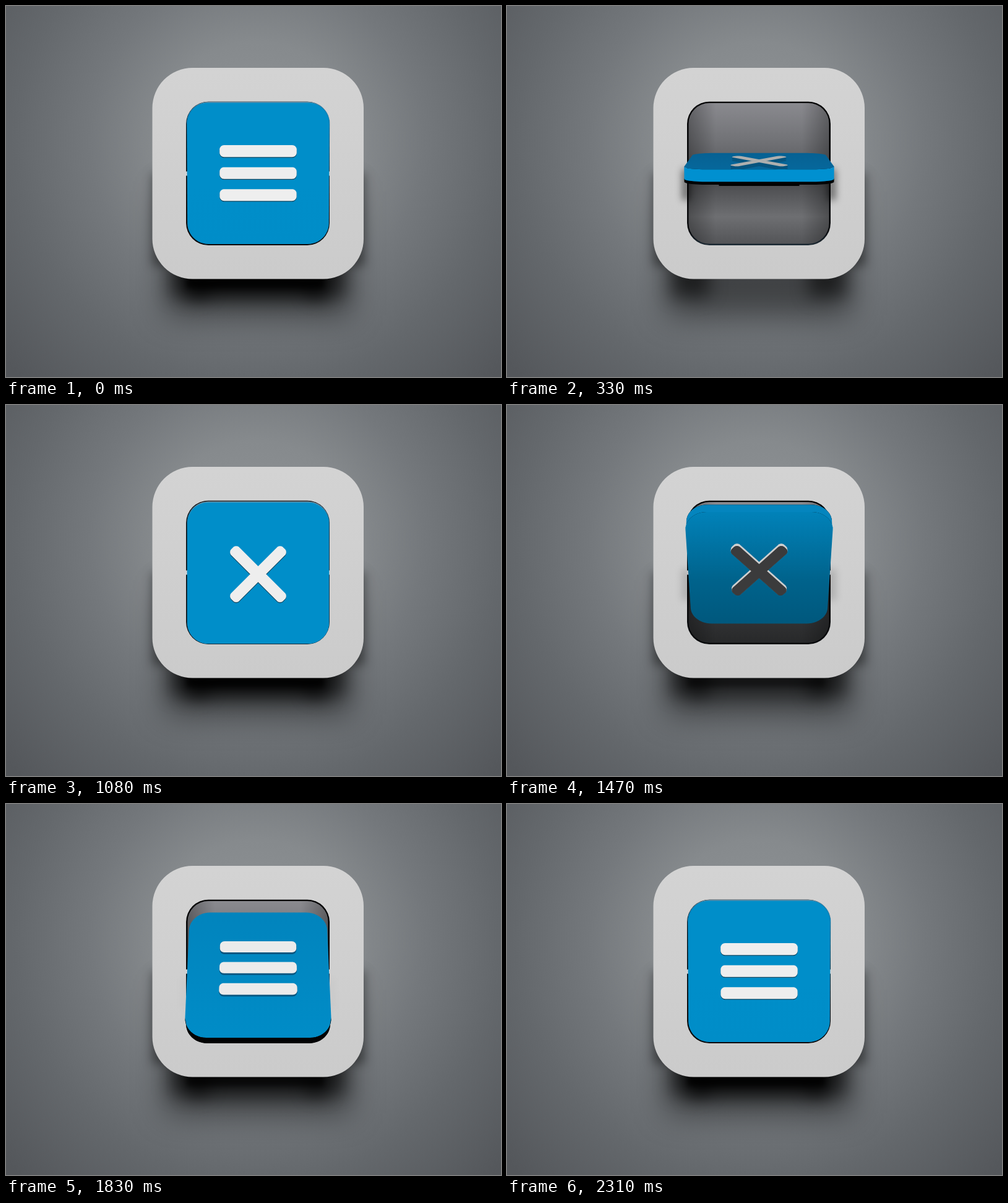
These frames come from a looping animation (800 by 600 pixels, 2.34 s). An HTML page with a canvas:

```html
<!DOCTYPE html>
<html lang="en">
<head>
<meta charset="utf-8">
<title>Flip button</title>
<style>
html, body { margin: 0; width: 100%; height: 100%; overflow: hidden; background: #63676b; }
canvas { display: block; width: 800px; height: 600px; }
</style>
</head>
<body>
<canvas id="stage" width="800" height="600"></canvas>
<script>
const ctx = document.getElementById('stage').getContext('2d');
const LOOP = 2340, STEP = 30;
const AXIS = { x: 407.5, y: 271.5 }, DEPTH = 1360;
const HALF = 114, THICK = 10;
const BLUE = [0, 142, 201];

// total rotation in degrees over time
const KEYS = [
  [0, 4], [60, 9], [180, 40], [330, 97], [480, 170], [570, 200], [630, 203],
  [780, 176], [930, 181], [1080, 180], [1230, 182], [1350, 195], [1500, 225],
  [1620, 260], [1740, 303], [1830, 332], [1950, 362], [2040, 371],
  [2190, 365], [2310, 364], [2340, 364]
];

function spinAt(time) {
  let i = 0;
  while (i < KEYS.length - 2 && KEYS[i + 1][0] <= time) i++;
  const slope = n => {
    const a = KEYS[n - 1], b = KEYS[n + 1];
    return a && b ? (b[1] - a[1]) / (b[0] - a[0]) : 0;
  };
  const [t0, v0] = KEYS[i], [t1, v1] = KEYS[i + 1];
  const d = t1 - t0, u = (time - t0) / d, u2 = u * u, u3 = u2 * u;
  return v0 * (2 * u3 - 3 * u2 + 1) + v1 * (3 * u2 - 2 * u3) +
    d * (slope(i) * (u3 - 2 * u2 + u) + slope(i + 1) * (u3 - u2));
}

const mix = (a, b, k) => a.map((c, i) => c + (b[i] - c) * k);
const css = (c, alpha = 1) => `rgba(${c.map(Math.round).join(',')},${alpha})`;
const clamp = v => Math.max(0, Math.min(1, v));

function vertical(y0, y1, ...stops) {
  const g = ctx.createLinearGradient(0, y0, 0, y1);
  stops.forEach(([at, color]) => g.addColorStop(at, color));
  return g;
}

function roundRect(x, y, w, h, r) {
  ctx.beginPath();
  ctx.roundRect(x, y, w, h, r);
}

function blurred(x, y, w, h, blur, alpha) {
  ctx.save();
  ctx.filter = `blur(${blur}px)`;
  ctx.fillStyle = `rgba(0,0,0,${alpha})`;
  ctx.fillRect(x, y, w, h);
  ctx.restore();
}

function polygon(points, fill) {
  ctx.beginPath();
  points.forEach(p => ctx.lineTo(p[0], p[1]));
  ctx.closePath();
  ctx.fillStyle = fill;
  ctx.fill();
}

// sampled rounded rectangle, optionally turned about its centre
function outline(halfW, halfH, r, cy = 0, turn = 0) {
  const pts = [], n = 12, c = Math.cos(turn), s = Math.sin(turn);
  for (let q = 0; q < 4; q++) {
    const sx = q === 0 || q === 3 ? 1 : -1, sy = q < 2 ? 1 : -1;
    for (let i = 0; i <= n; i++) {
      const a = (q + i / n) * Math.PI / 2;
      const x = sx * (halfW - r) + r * Math.cos(a);
      const y = sy * (halfH - r) + r * Math.sin(a);
      pts.push([x * c - y * s, cy + x * s + y * c]);
    }
  }
  return pts;
}

const PLATE = outline(HALF, HALF, 34);
const MENU = [36, 1.3, -33.5].map(y => outline(61.5, 9.3, 7, y));
const CROSS = [1, -1].map(d => outline(58.5, 9, 7, -2, d * Math.PI / 4));

function makeBackdrop() {
  const g = ctx.createRadialGradient(405, 220, 0, 405, 220, 540);
  [[0, '#909497'], [.3, '#868a8d'], [.5, '#74787c'], [.72, '#64686c'], [1, '#54575b']]
    .forEach(([at, color]) => g.addColorStop(at, color));
  ctx.fillStyle = g;
  ctx.fillRect(0, 0, 800, 600);
}

function drawShadow(open) {
  const shut = 1 - open;
  blurred(258, 300, 298, 200, 26, .48);
  blurred(236, 270, 344, 150, 8, .4);
  blurred(266, 360, 60, 110, 14, .55);
  blurred(488, 360, 60, 110, 14, .55);
  blurred(292, 380, 226, 92, 14, .85 * shut);
  blurred(292, 400, 222, 56, 4, .75 * shut);
}

function drawHole(open) {
  const low = (gray, k) => css(mix([4, 5, 6], [gray, gray + 1, gray + 4], open * k));
  roundRect(291, 154.5, 232, 232.5, 36);
  ctx.fillStyle = vertical(155, 387, [0, '#8b8b90'], [.25, '#737478'], [.48, '#5a5b5e'],
    [.58, low(76, 1)], [.8, low(110, 1)], [1, low(82, 1)]);
  ctx.fill();
  ctx.save();
  ctx.clip();
  const side = ctx.createLinearGradient(291, 0, 523, 0);
  [[0, .3], [.2, 0], [.8, 0], [1, .3]].forEach(([at, a]) => side.addColorStop(at, `rgba(0,0,0,${a})`));
  ctx.fillStyle = side;
  ctx.fillRect(291, 154, 232, 234);
  roundRect(291, 154.5, 232, 232.5, 36);
  ctx.lineWidth = 5;
  ctx.strokeStyle = vertical(155, 387, [0, '#020203'], [.9, '#08090b'], [1, open > .6 ? '#1d2b36' : '#06080a']);
  ctx.stroke();
  ctx.restore();
}

function drawFrame() {
  ctx.beginPath();
  ctx.roundRect(236.5, 100, 341.5, 341.5, 65);
  ctx.roundRect(291, 154.5, 232, 232.5, 36);
  ctx.fillStyle = vertical(100, 441, [0, '#d3d3d3'], [1, '#cbcbcb']);
  ctx.fill('evenodd');
}

function drawPins() {
  ctx.fillStyle = '#d2d3d5';
  roundRect(290, 267.5, 5, 7, 1.5);
  ctx.fill();
  roundRect(519, 267.5, 5, 7, 1.5);
  ctx.fill();
}

function drawPlate(spin) {
  const side = Math.round(spin / 180);
  const degrees = side * 180 - spin;
  const tilt = degrees * Math.PI / 180;
  const sin = Math.sin(tilt), cos = Math.cos(tilt), double = Math.sin(2 * tilt);
  const size = Math.abs(sin);
  const midY = AXIS.y - 14 * sin ** 4 + 8 * double;
  const iconCos = cos + .09 * Math.abs(double) + .05 * sin * sin;
  const iconLift = 17 + 9 * double - 10 * sin ** 7;

  const project = (x, v, w, squash = cos) => {
    const scale = DEPTH / (DEPTH + v * sin - w * cos);
    return [AXIS.x + x * scale, midY - (v * squash + w * sin) * scale];
  };
  const layer = w => PLATE.map(([x, v]) => project(x, v, w));

  // soft contact shadow on the frame's inner sides
  if (size > .45) {
    const k = clamp((size - .45) / .5);
    blurred(283, midY + 4, 12, 50, 6, .5 * k);
    blurred(519, midY + 4, 12, 50, 6, .5 * k);
  }

  const front = layer(THICK), back = layer(-THICK);
  polygon(back, '#020304');

  let top, bottom;
  if (sin >= 0) {
    top = mix(BLUE, [6, 96, 146], sin ** 2);
    bottom = mix(BLUE, [6, 102, 154], sin ** 4);
  } else {
    top = mix(BLUE, [4, 58, 88], sin ** 4);
    bottom = mix(BLUE, [0, 0, 0], sin ** 2);
  }
  const ys = front.map(p => p[1]);
  const y0 = Math.min(...ys), y1 = Math.max(...ys);
  const middle = sin < 0 ? mix(top, bottom, size > .6 ? .75 : .1) : mix(top, bottom, .6);
  polygon(front, vertical(y0, y1, [0, css(top)], [.6, css(middle)], [1, css(bottom)]));
  if (size < .4) {
    ctx.strokeStyle = vertical(y0, y1, [0, 'rgba(120,150,168,.9)'], [.12, 'rgba(50,120,160,.4)'], [.3, 'rgba(0,70,110,0)'], [1, 'rgba(0,70,110,0)']);
    ctx.lineWidth = 1.6;
    ctx.stroke();
  }

  // raised symbol
  const parts = side % 2 ? CROSS : MENU;
  const drawParts = (w, fill, drop = 0) => parts.forEach(part =>
    polygon(part.map(([x, v]) => {
      const p = project(x, v, w, iconCos);
      return [p[0], p[1] + drop];
    }), fill));
  const under = sin < -.6;
  const flank = under ? '#cfcfcf' : '#07557f';
  if (!under) drawParts(iconLift, 'rgba(20,60,80,.85)', 1.3);
  for (let d = size > .2 ? 6 : 0; d > 0; d--) drawParts(iconLift - d, flank);
  let light = sin > 0 ? mix([238, 238, 238], [172, 173, 172], sin ** 4)
    : mix([238, 238, 238], [2, 2, 3], clamp((size - .4) * 2.4));
  if (under) light = mix(light, [2, 2, 3], .5);
  drawParts(iconLift, css(light));

  // underside of the symbol on the opposite face
  if (degrees > 66 && side % 2) {
    polygon([[-63, 0], [63, 0], [63, -25], [-63, -25]].map(([x, w]) => project(x, -45, w)), '#020203');
  }

  // near edge of the plate
  if (size > .03) {
    const sign = sin > 0 ? -1 : 1;
    const lit = sin > 0 ? clamp((sin - .5) / .42) : .95;
    const wallColor = css(mix([2, 3, 4], sin > 0 ? [0, 144, 208] : [4, 140, 200], lit));
    const strip = (from, to, fill) => {
      const near = PLATE.filter(p => p[1] * sign >= HALF - 34);
      const a = near.map(([x, v]) => project(x, v, from));
      const b = near.map(([x, v]) => project(x, v, to));
      polygon(a.concat(b.reverse()), fill);
    };
    if (sin > 0) strip(-7, -THICK - 3 * sin, '#020304');
    strip(THICK, sin > 0 ? -8.5 : -THICK, wallColor);
  }
}

function draw(now) {
  const time = Math.floor((now % LOOP) / STEP) * STEP;
  const spin = spinAt(time);
  const open = clamp((Math.abs(Math.sin(spin * Math.PI / 180)) - .35) / .6);
  makeBackdrop();
  drawShadow(open);
  drawHole(open);
  drawFrame();
  drawPins();
  drawPlate(spin);
}

let start;
function tick(now) {
  if (start === undefined) start = now;
  draw(Math.max(0, now - start));
  requestAnimationFrame(tick);
}
draw(0);
requestAnimationFrame(tick);
</script>
</body>
</html>
```
